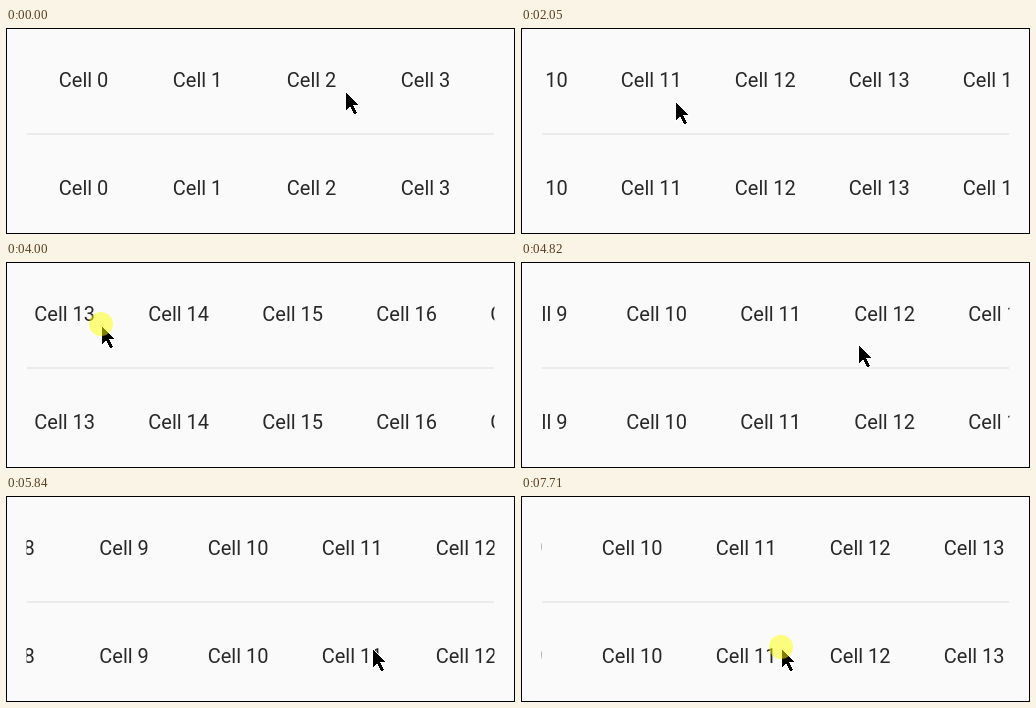
Recreate the animation shown at these times as an HTML page. Size 509 by 206 pixels, loop 8000 ms.

```html
<!DOCTYPE html>
<html lang="en">
<head>
<meta charset="utf-8">
<title>Linked scrolling rows</title>
<style>
  html, body { margin: 0; width: 100%; height: 100%; overflow: hidden; background: #fafafa; }
  svg { display: block; width: 509px; height: 206px; }
  text { font: 400 20px Roboto, sans-serif; text-anchor: middle; fill: #282828; }
</style>
</head>
<body>
<svg viewBox="0 0 509 206">
  <clipPath id="view"><rect x="20.5" y="20" width="468" height="170"/></clipPath>
  <rect width="509" height="206" fill="#fafafa"/>
  <rect x="21" y="105" width="467" height="2" fill="#ebebeb"/>
  <g clip-path="url(#view)"><g id="cells"></g></g>
  <g id="pointer">
    <path d="M1 2v18l4-4 4 8 3-1-4-8h5z" stroke="#fff" stroke-width="1.6"
      paint-order="stroke" shape-rendering="crispEdges"/>
    <circle id="press" r="12" fill="#ff0" fill-opacity=".5"/>
  </g>
  <rect x=".5" y=".5" width="508" height="205" fill="none" stroke="#000"/>
</svg>
<script>
const LOOP = 8000, STEP = 48.4, PHASE = 14;
const CELLS = 20, PITCH = 114, FIRST = 77.6;
const HOME = [339, 62];

// Pointer moves; a pressed move drags the rows, then flings them over the glide time
const moves = [
  { start: 600, end: 840, to: [57, 64], press: [600, 840], fling: 633, glide: 1220 },
  { start: 1100, end: 1480, to: [387, 70] },
  { start: 1510, end: 1780, to: [154, 72], press: [1500, 1780], fling: 471, glide: 1640 },
  { start: 2400, end: 3300, to: [95, 62] },
  { start: 4000, end: 4340, to: [401.5, 74], press: [3980, 4340], fling: -222, glide: 1860 },
  { start: 4400, end: 4780, to: [337, 81] },
  { start: 4840, end: 5560, to: [366, 151] },
  { start: 5860, end: 6180, to: [394, 153] },
  { start: 7130, end: 7700, to: [260, 151], press: [7030, LOOP], fling: 0, glide: 1 }
];

const $ = id => document.getElementById(id);
const cells = $('cells'), pointer = $('pointer'), press = $('press');

for (const y of [59, 167]) {
  for (let i = 0; i < CELLS; i++) {
    const label = document.createElementNS('http://www.w3.org/2000/svg', 'text');
    label.setAttribute('x', FIRST + PITCH * i);
    label.setAttribute('y', y);
    label.textContent = `Cell ${i}`;
    cells.append(label);
  }
}

const clamp = u => Math.min(1, Math.max(0, u));
const smooth = u => u * u * (3 - 2 * u);
const decay = u => (1 - Math.exp(-2.5 * u)) / (1 - Math.exp(-2.5));

function pose(t) {
  let [x, y] = HOME, scroll = 0, down = false;
  moves.forEach((m, i) => {
    const u = clamp((t - m.start) / (m.end - m.start));
    const p = m.press ? u : smooth(u);
    const dx = (m.to[0] - x) * p;
    x += dx;
    y += (m.to[1] - y) * p;
    if (!m.press) return;
    // The next drag catches the rows in mid-fling
    const caught = moves.slice(i + 1).find(n => n.press)?.start ?? LOOP;
    const glided = clamp((Math.min(t, caught) - m.end) / m.glide);
    scroll += m.fling * decay(glided) - dx;
    down ||= t >= m.press[0] && t < m.press[1];
  });
  return { x, y, scroll, down };
}

function draw(now) {
  const t = PHASE + Math.floor((now % LOOP - PHASE) / STEP) * STEP;
  const { x, y, scroll, down } = pose(t);
  cells.setAttribute('transform', `translate(${-scroll})`);
  pointer.setAttribute('transform', `translate(${Math.round(x)} ${Math.round(y)})`);
  press.setAttribute('visibility', down ? 'visible' : 'hidden');
}

const begin = performance.now();
function tick() {
  draw(performance.now() - begin);
  requestAnimationFrame(tick);
}
tick();
</script>
</body>
</html>
```
